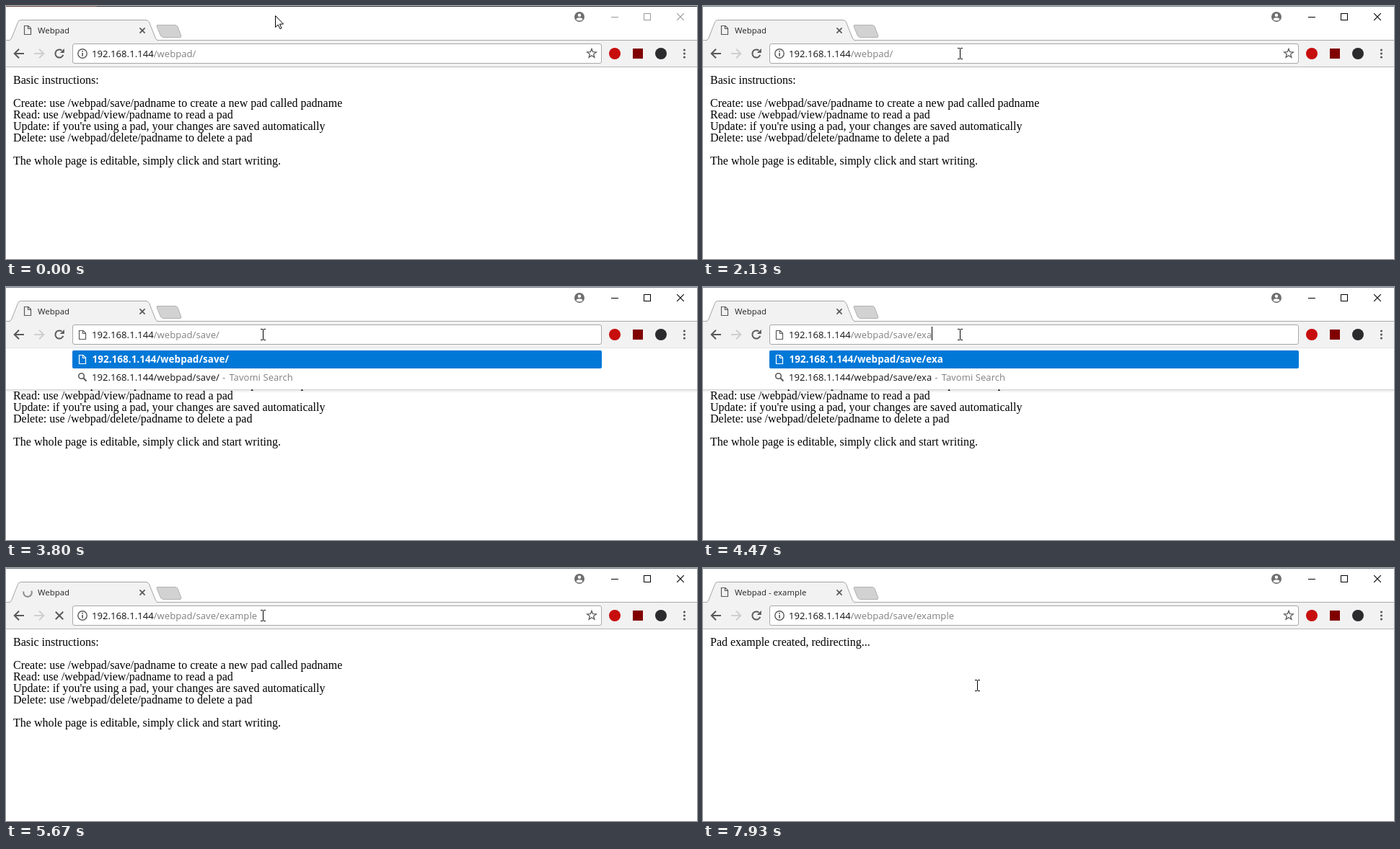
An HTML page with a canvas that plays this animation: 958x351 px, repeating every 8000 ms.

```html
<!DOCTYPE html>
<html lang="en">
<head>
<meta charset="utf-8">
<title>Webpad</title>
<style>
  html, body { margin: 0; width: 100%; height: 100%; overflow: hidden; background: #fff; }
  canvas { display: block; }
</style>
</head>
<body>
<canvas id="stage" width="958" height="351"></canvas>
<script>
const ctx = document.getElementById('stage').getContext('2d', { alpha: false });
const W = 958, H = 351, LOOP = 8000;
const UI = '"Open Sans", "Noto Sans", sans-serif';
const SERIF = '"Liberation Serif", "Times New Roman", serif';
const BLUE = '#0078d7', GREY = '#808080', ICON = '#5a5a5a', BAR = '#f2f2f2';
const HOST = '192.168.1.144', PATH = '/webpad/', WORD = 'example';
const HELP = [
  [108, 'Basic instructions:'],
  [140, 'Create: use /webpad/save/padname to create a new pad called padname'],
  [156, 'Read: use /webpad/view/padname to read a pad'],
  [172, "Update: if you're using a pad, your changes are saved automatically"],
  [188, 'Delete: use /webpad/delete/padname to delete a pad'],
  [220, 'The whole page is editable, simply click and start writing.']
];

// Key moments in ms
const FOCUS = 870, SELECT = 1070, DESELECT = 1600, TYPE = 2470;
const ENTER = 5670, COMMIT = 5870, LOADED = 6000;

// Every keystroke: [time, text after the path]
const keys = [[TYPE, 's'], [2530, 'sa'], [2670, 'sav'], [2730, 'save'], [3270, 'save/'], [4070, 'save/e']];
for (let i = 2; i <= WORD.length; i++) {
  keys.push([4270 + (i - 2) * 106, 'save/' + WORD.slice(0, i)]);
}
const blinks = [FOCUS, DESELECT, ...keys.map(k => k[0])];

// Pointer moves: start, end, number of steps, target
const moves = [
  [130, 530, 6, 356, 66],
  [6530, 6800, 5, 206, 188],
  [7670, 7930, 5, 380, 163]
];

function rect(x, y, w, h, color) {
  ctx.fillStyle = color;
  ctx.fillRect(x, y, w, h);
}

function line(pts, color, width = 1, close = false, fill = null) {
  ctx.beginPath();
  pts.forEach(([x, y], i) => i ? ctx.lineTo(x, y) : ctx.moveTo(x, y));
  if (close) ctx.closePath();
  if (fill) { ctx.fillStyle = fill; ctx.fill(); }
  if (color) { ctx.strokeStyle = color; ctx.lineWidth = width; ctx.stroke(); }
}

function disc(x, y, r, color) {
  ctx.beginPath();
  ctx.arc(x, y, r, 0, 7);
  ctx.fillStyle = color;
  ctx.fill();
}

function arc(x, y, r, from, to, color, width) {
  ctx.beginPath();
  ctx.arc(x, y, r, from, to);
  ctx.strokeStyle = color;
  ctx.lineWidth = width;
  ctx.stroke();
}

function box(x, y, w, h, r, fill, stroke) {
  ctx.beginPath();
  ctx.roundRect(x, y, w, h, r);
  ctx.fillStyle = fill;
  ctx.fill();
  if (stroke) { ctx.strokeStyle = stroke; ctx.lineWidth = 1; ctx.stroke(); }
}

// Draws text and returns the x where it ends
function text(str, x, y, color, font = '13px ' + UI, spacing = 0.08) {
  ctx.font = font;
  ctx.letterSpacing = spacing + 'px';
  ctx.fillStyle = color;
  ctx.fillText(str, x, y);
  return x + ctx.measureText(str).width;
}

function cross(x, y, r, color, width) {
  line([[x - r, y - r], [x + r, y + r]], color, width);
  line([[x - r, y + r], [x + r, y - r]], color, width);
}

function sheet(x, y, color) {
  line([[x + .5, y + .5], [x + 6, y + .5], [x + 9.5, y + 4], [x + 9.5, y + 12.5], [x + .5, y + 12.5]], color, 1.2, true, null);
  line([[x + 5.5, y + .5], [x + 5.5, y + 4.5], [x + 9.5, y + 4.5]], color, 1.2);
}

function arrow(x, dir, color) {
  line([[x - dir * 7, 66], [x + dir * 6, 66]], color, 2);
  line([[x, 59.7], [x + dir * 6.3, 66], [x, 72.3]], color, 2);
}

function reload() {
  arc(74, 66, 5.6, .35, 5.35, ICON, 2);
  line([[80.8, 59], [80.8, 65], [74.8, 65]], null, 1, true, ICON);
}

function star(x, y) {
  const pts = [];
  for (let i = 0; i < 10; i++) {
    const r = i % 2 ? 2.8 : 6.6, a = i * Math.PI / 5 - Math.PI / 2;
    pts.push([x + r * Math.cos(a), y + r * Math.sin(a)]);
  }
  line(pts, ICON, 1.3, true);
}

function drawPage(t) {
  const lines = t < COMMIT ? HELP : [[108, 'Pad example created, redirecting...']];
  for (const [y, str] of lines) text(str, 10, y, '#000', '16px ' + SERIF, 0);
}

function drawFrame(active) {
  rect(0, 0, W, 48, '#fff');
  rect(0, 0, W, 1, active ? '#6b7b85' : '#2e2e2e');
  if (!active) rect(0, 0, 126, 1, '#6a4438');

  disc(795, 15, 7, '#6e6e6e');
  disc(795, 12.8, 2.2, '#fff');
  ctx.beginPath();
  ctx.ellipse(795, 18.3, 4.2, 2, 0, 0, 7);
  ctx.fillStyle = '#fff';
  ctx.fill();

  const c = active ? '#000' : '#999';
  rect(839, 15, 10, 1, c);
  ctx.strokeStyle = c;
  ctx.lineWidth = 1;
  ctx.strokeRect(884.5, 10.5, 9, 9);
  cross(935, 15, 4.8, c, 1.1);
}

function drawTab(t) {
  rect(0, 47, W, 1, '#a9a9a9');
  rect(0, 48, W, 36, BAR);
  ctx.beginPath();
  ctx.moveTo(4, 48);
  ctx.quadraticCurveTo(7, 47, 8, 44);
  ctx.lineTo(16.5, 22.5);
  ctx.quadraticCurveTo(17.5, 19.5, 20.5, 19.5);
  ctx.lineTo(194, 19.5);
  ctx.quadraticCurveTo(197, 19.5, 198.5, 22.5);
  ctx.lineTo(207, 44);
  ctx.quadraticCurveTo(208, 47, 211, 48);
  ctx.fillStyle = BAR;
  ctx.fill();
  ctx.strokeStyle = '#a4a4a4';
  ctx.lineWidth = 1;
  ctx.stroke();

  ctx.lineJoin = 'round';
  line([[209.5, 26.5], [235.5, 26.5], [238, 28.5], [243, 42], [242, 43.5], [217.5, 43.5], [214.5, 41.5], [209, 28]], '#b0b0b0', 1, true, '#d2d2d2');
  ctx.lineJoin = 'miter';

  if (t >= ENTER && t < LOADED) {
    const blue = t >= COMMIT;
    const a = (t - COMMIT) / 1000 * (blue ? 6 : -4);
    arc(30, 34, 5.8, a - 1.2, a + 2.6, blue ? '#4a8ad4' : '#8c8c8c', 2);
  } else {
    sheet(25, 27, ICON);
  }
  text(t < COMMIT ? 'Webpad' : 'Webpad - example', 44, 38, '#222', '11.3px ' + UI);
  cross(189, 34, 3.6, ICON, 1.7);
}

function drawToolbar(t, editing) {
  rect(0, 84, W, 1, editing ? '#e4e4e4' : '#b8b8b8');
  arrow(18, -1, ICON);
  arrow(46, 1, '#cfcfcf');
  if (t >= ENTER && t < LOADED) cross(74, 66, 5.2, ICON, 2);
  else reload();

  box(92.5, 52.5, 733, 27, 2.5, '#fff', '#a8a8a8');
  if (editing) {
    sheet(101, 60, ICON);
  } else {
    arc(106, 66, 6.2, 0, 7, ICON, 1.4);
    rect(105.2, 65, 1.7, 4.6, ICON);
    rect(105.2, 62, 1.7, 1.7, ICON);
    star(812, 66);
  }

  disc(844, 66, 8, '#c70d0d');
  rect(869, 59, 14, 14, '#800000');
  disc(908, 66, 8, '#2b2b2e');
  for (const y of [61, 66, 71]) disc(940.5, y, 1.6, ICON);
}

function drawAddress(t, typed) {
  const selected = t >= SELECT && t < DESELECT;
  if (selected) rect(119, 55, 145, 19, BLUE);
  const mid = text(HOST, 119, 71, selected ? '#fff' : '#111');
  const end = text(PATH + typed, mid, 71, selected ? '#fff' : GREY);
  const last = blinks.filter(b => b <= t).pop();
  if (!selected && t < ENTER && t - last < 530) rect(Math.round(end), 55, 1, 19, '#000');
}

function drawPopup(typed) {
  rect(0, 85, W, 57, '#fff');
  for (let i = 0; i < 5; i++) rect(0, 142 + i, W, 1, `rgba(0,0,0,${[.17, .08, .05, .03, .01][i]})`);
  box(92, 88, 734, 25, 2, BLUE);
  sheet(101, 94, '#fff');
  text(HOST + PATH + typed, 119.5, 105, '#fff', 'bold 13.4px ' + UI);

  arc(104.5, 123.5, 3.8, 0, 7, ICON, 1.6);
  line([[107.3, 126.3], [111.5, 130.5]], ICON, 2);
  const end = text(HOST + PATH + typed, 119, 130, '#111');
  text('-', end + 4, 130, GREY);
  text('Tavomi Search', end + 13.5, 130, GREY);
}

function pointer(t) {
  let x = 373, y = 13;
  for (const [from, to, n, tx, ty] of moves) {
    if (t < from) break;
    const k = Math.min(n, Math.floor((t - from) / (to - from) * (n - 1) + 1e-6) + 1);
    const p = k / n, e = p * p * (3 - 2 * p);
    x += (tx - x) * e;
    y += (ty - y) * e;
  }
  return [Math.round(x), Math.round(y)];
}

function drawPointer(t) {
  const [x, y] = pointer(t);
  if (y < 52) {
    const shape = [[0, 0], [0, 16], [3.7, 12.6], [6.4, 18.2], [8.6, 17.2], [6, 11.7], [11, 11.5]];
    line(shape.map(([a, b]) => [x + .5 + a, y + .5 + b]), '#000', 1, true, '#fff');
    return;
  }
  rect(x, y - 7, 1, 14, '#000');
  for (const dy of [-8, 7]) {
    rect(x - 3, y + dy, 3, 1, '#000');
    rect(x + 1, y + dy, 3, 1, '#000');
  }
}

function draw(t) {
  const key = keys.filter(k => k[0] <= t).pop();
  const typed = key ? key[1] : '';
  const editing = t >= TYPE && t < ENTER;
  rect(0, 0, W, H, '#fff');
  drawPage(t);
  drawFrame(t >= FOCUS);
  drawTab(t);
  drawToolbar(t, editing);
  drawAddress(t, typed);
  if (editing) drawPopup(typed);
  drawPointer(t);
}

const start = performance.now();
function tick() {
  draw((performance.now() - start) % LOOP);
  requestAnimationFrame(tick);
}
tick();
</script>
</body>
</html>
```
